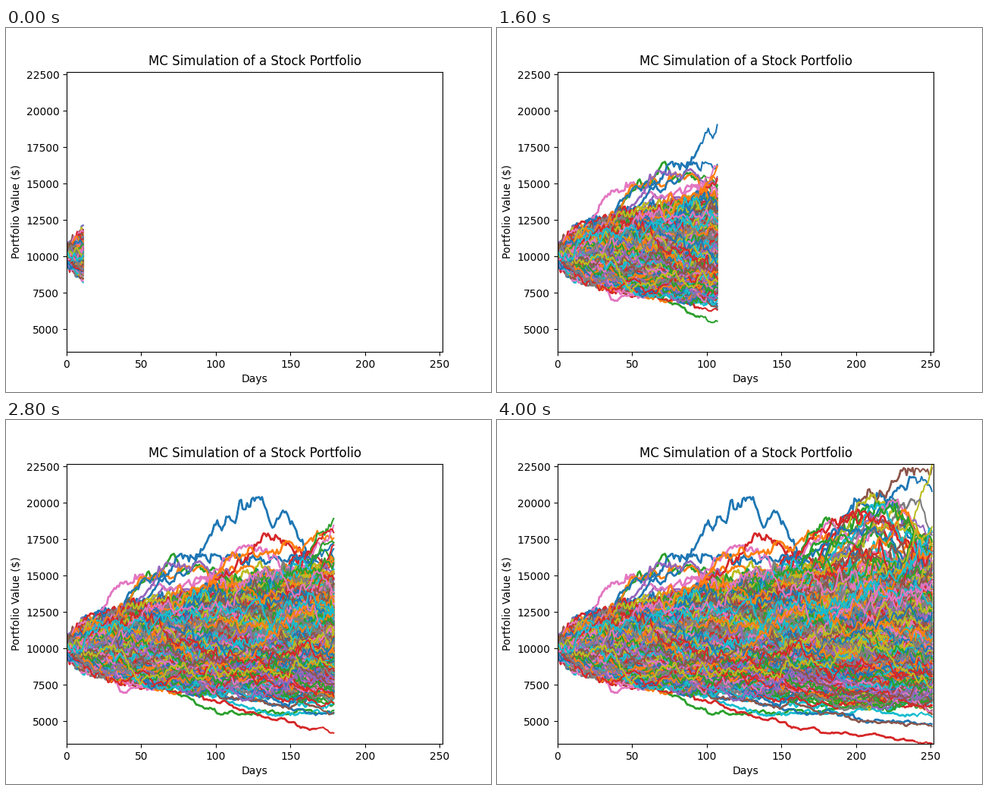
Write a matplotlib script that moves like this. It is 640 px wide and 480 px high and loops after 4200 ms.

```python
import numpy as np
import matplotlib.pyplot as plt
from matplotlib.animation import FuncAnimation
from matplotlib.collections import LineCollection

DAYS, STEP, FRAMES = 252, 12, 21
START, SIMS, CLIMBERS = 10000, 560, 14
CYCLE = [f"C{i}" for i in range(10)]
BLUE, ORANGE, GREEN, RED, PURPLE, BROWN, PINK, _, OLIVE, CYAN = CYCLE

rng = np.random.default_rng(12)
days = np.arange(DAYS)

# Portfolios that leave the crowd: colour, then (day, value in thousands) turning points.
OUTLIERS = [
    (PINK, (34, 14.3), (51, 15.1)),
    (GREEN, (72, 16.5)),
    (ORANGE, (58, 14.9), (78, 15.7)),
    (BLUE, (77, 16.5), (107, 16.3)),
    (BLUE, (85, 15.8), (101, 18.8), (131, 20.4), (137, 18.5), (147, 19.4), (163, 15.8)),
    (PURPLE, (89, 16.0)),
    (PINK, (122, 17.1)),
    (RED, (132, 17.9), (147, 17.1)),
    (ORANGE, (168, 18.1)),
    (GREEN, (160, 16.2), (180, 19.0)),
    (BLUE, (165, 15.0), (199, 20.3), (244, 21.8), (251, 20.8)),
    (BROWN, (165, 15.0), (207, 20.3), (251, 22.4)),
    (OLIVE, (165, 15.0), (201, 20.0), (234, 18.6), (251, 22.6)),
    (PINK, (40, 6.95)),
    (GREEN, (94, 5.9), (115, 5.45)),
    (CYAN, (163, 5.5), (251, 5.3)),
    (BLUE, (207, 4.9), (251, 4.8)),
    (BROWN, (251, 4.65)),
    (RED, (105, 6.4), (163, 4.4), (203, 4.0), (251, 3.47)),
]


def guided_path(points):
    """Random walk through the turning points that never passes the farthest one."""
    day, value = np.array([(0, START / 1000), *points]).T
    level = np.log(value * 1000 / START)
    extreme = level[np.argmax(np.abs(level))]
    if day[-1] < DAYS - 1:  # drift halfway back to the start value
        day, level = np.append(day, DAYS - 1), np.append(level, extreme / 2)
    walk = np.cumsum(rng.normal(0, 0.012, DAYS))
    pinned = walk - np.interp(days, day, walk[day.astype(int)])
    path = np.interp(days, day, level) + pinned
    return START * np.exp(extreme - np.sign(extreme) * np.abs(extreme - path))


def crowd_paths(count):
    """Geometric random walks that stay inside a band widening with sqrt(time)."""
    walks = np.cumsum(rng.normal(0, 0.02, (3 * count, DAYS)), axis=1)
    inside = (np.abs(walks) < 0.08 + 0.035 * np.sqrt(days)).all(axis=1)
    return START * np.exp(walks[inside][:count])


def late_climber(i):
    peak, height = rng.integers(192, 246), rng.uniform(18.3, 20.4)
    return CYCLE[i % 10], (150, rng.uniform(13, 15.5)), (peak, height), (251, rng.uniform(15, 18.2))


special = OUTLIERS + [late_climber(i) for i in range(CLIMBERS)]
crowd = crowd_paths(SIMS)
crowd_colors = [CYCLE[i % 10] for i in range(len(crowd))]
half = len(crowd) // 2
values = np.vstack([crowd[:half], [guided_path(points) for _, *points in special], crowd[half:]])
colors = crowd_colors[:half] + [color for color, *_ in special] + crowd_colors[half:]
paths = np.stack([np.broadcast_to(days, values.shape), values], axis=-1)

fig, ax = plt.subplots(figsize=(6.4, 4.8), dpi=100)
ax.set(xlim=(0, 252), ylim=(3440, 22690), xlabel="Days", ylabel="Portfolio Value ($)",
       title="MC Simulation of a Stock Portfolio")


def add_lines(width):
    lines = LineCollection([], colors=colors, linewidths=width,
                           joinstyle="round", capstyle="projecting")
    return ax.add_collection(lines, autolim=False)


# Days already drawn look bolder than the newest stretch.
settled = add_lines(1.95)
fresh = add_lines(1.5)


def update(frame):
    end = STEP * (frame + 1)
    settled.set_segments(paths[:, :end - STEP] if frame else [])
    fresh.set_segments(paths[:, :end])
    return settled, fresh


anim = FuncAnimation(fig, update, frames=FRAMES, interval=200, repeat=True, repeat_delay=0)
plt.show()
```
